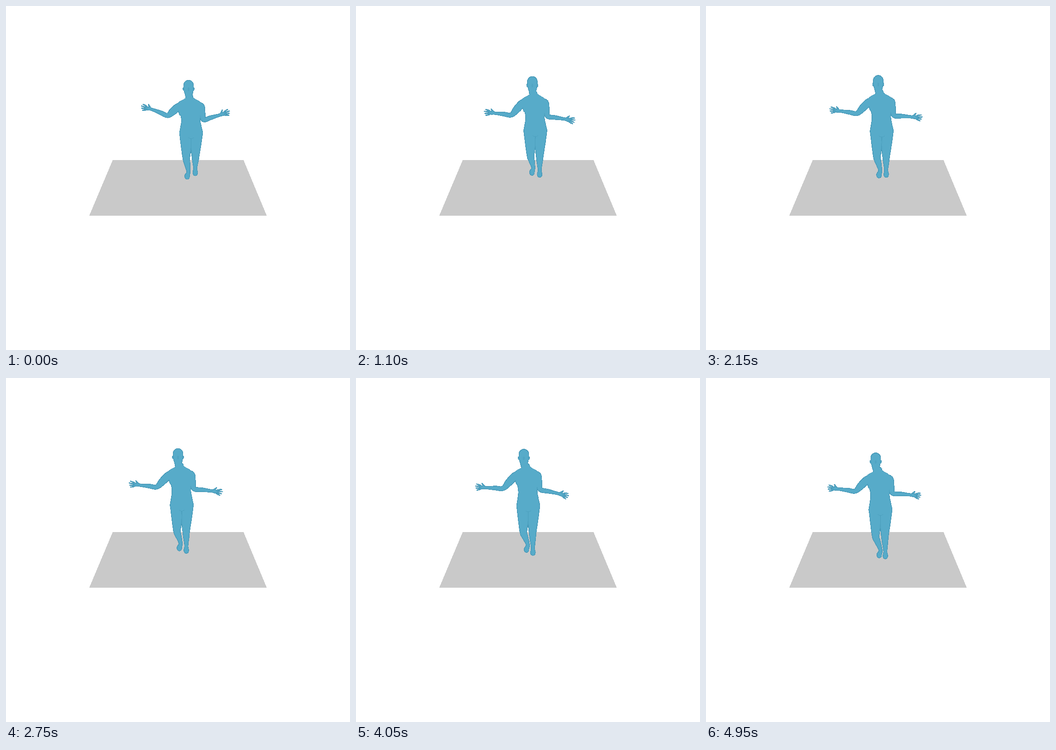
These frames come from a looping animation (748 by 748 pixels, 5000 ms). An HTML page:

```html
<!DOCTYPE html>
<html lang="en">
<head>
<meta charset="utf-8">
<title>Walking figure</title>
<style>
  html, body { margin: 0; width: 100%; height: 100%; overflow: hidden; background: #fff; }
  svg { display: block; width: 100vw; height: 100vh; }
</style>
</head>
<body>
<svg viewBox="0 0 748 748" shape-rendering="crispEdges">
  <path d="M232 335H516.500L567 456H181Z" fill="#c9c9c9"/>
  <g id="body">
    <path fill="#4595b4"/>
    <path fill="#4ea2c1"/>
    <path fill="#57abc9"/>
  </g>
  <ellipse id="nose" rx="2" ry="4" fill="#4b9ebd" opacity=".5"/>
  <path id="crease" fill="none" stroke="#4a9ebd" opacity=".7"/>
</svg>
<script>
const LOOP = 5000, STEP = 50;

// Key poses: top of the head, height of the hands, lead of the right foot
const keys = {
  time: [0, 650, 1600, 2750, 3450, 4050, 4950],
  x:    [397, 391, 375, 374, 369, 365, 369],
  y:    [161, 158, 151.5, 153, 153.5, 154.5, 162.5],
  hand: [5, 25, 17, 21, 25, 25, 20],
  lead: [-8, 16, -3, 5, 5.5, 6.5, 2]
};

const mix = (a, b, u) => a + (b - a) * u;
const between = (a, b, u, r) => [mix(a[0], b[0], u), mix(a[1], b[1], u), r];
const cubic = (a, b, c, d, u) =>
  b + u * (c - a + u * (2 * a - 5 * b + 4 * c - d + u * (3 * (b - c) + d - a))) / 2;

// Smooth round-ended tube through nodes of [x, y, radius]
function tube(nodes, inset) {
  const pts = [], last = nodes.length - 1, n = 6;
  for (let i = 0; i < last; i++) {
    const a = nodes[Math.max(0, i - 1)], b = nodes[i];
    const c = nodes[i + 1], d = nodes[Math.min(last, i + 2)];
    for (let k = 0; k < n; k++) pts.push([0, 1, 2].map(j => cubic(a[j], b[j], c[j], d[j], k / n)));
  }
  pts.push(nodes[last]);
  const size = p => Math.max(.3, p[2] - inset);
  const left = [], right = [];
  pts.forEach((point, i) => {
    const p = pts[Math.max(0, i - 1)], q = pts[Math.min(pts.length - 1, i + 1)];
    const dx = q[0] - p[0], dy = q[1] - p[1], k = size(point) / (Math.hypot(dx, dy) || 1);
    const [x, y] = point;
    left.push((x + dy * k).toFixed(2) + " " + (y - dx * k).toFixed(2));
    right.unshift((x - dy * k).toFixed(2) + " " + (y + dx * k).toFixed(2));
  });
  const cap = (p, to) => `A${size(p)} ${size(p)} 0 0 1 ${to}`;
  return "M" + left.join("L") + cap(nodes[last], right[0]) + "L" + right.join("L") +
    cap(nodes[0], left[0]) + "Z";
}

function poseAt(t) {
  const { time } = keys;
  let i = 0;
  while (i < time.length - 2 && t >= time[i + 1]) i++;
  const span = time[i + 1] - time[i], u = (t - time[i]) / span;
  const at = name => mix(keys[name][i], keys[name][i + 1], u);

  // The figure bobs in whole steps between poses and grows as it comes nearer
  const wave = Math.sin(2 * Math.PI * u * Math.round(span / 480));
  const near = t / LOOP, grow = Math.min(1, near * 1.8), scale = .94 + .06 * grow;
  const head = [at("x"), at("y") + 6 * wave];
  const lean = 5.5 + 5 * near, lead = at("lead") / 2 + 4 * wave, hand = at("hand");
  const hip = [head[0] + lean, head[1] + 118 + 9 * grow];
  const chest = [head[0] + lean * .8, head[1] + 59];
  const from = (base, dx, dy) => [base[0] + dx, base[1] + dy];
  const knee = 51 + 4 * near, ankle = 77 + 9 * near;
  return {
    head, hip, chest,
    elbowL: from(chest, -53 * scale, 16 + .42 * hand),
    wristL: from(chest, -89 * scale, hand),
    elbowR: from(chest, 28.5, 29 * scale),
    wristR: from(chest, 66 * scale, hand + 12.5),
    kneeL: from(hip, -10.5, knee - lead / 4),
    ankleL: from(hip, 6 * near - 6, ankle - lead),
    kneeR: from(hip, 9.5, knee + lead / 4),
    ankleR: from(hip, 9 + 1.5 * near, ankle + lead)
  };
}

function arm(shoulder, elbow, wrist, side) {
  const rise = wrist[1] - elbow[1];
  const dir = Math.atan2(side < 0 ? .35 * rise - 1.3 : .8 * rise, 24);
  const point = (len, turn, r) =>
    [wrist[0] + side * len * Math.cos(dir + turn), wrist[1] + len * Math.sin(dir + turn), r];
  const parts = [[
    [shoulder[0] - side * 7, shoulder[1] + 1, 10],
    [...shoulder, 8.8],
    between(shoulder, elbow, .5, side < 0 ? 8.4 : 7),
    [...elbow, 5.6],
    between(elbow, wrist, .45, 5),
    [...wrist, 3.5],
    point(8, 0, 4.4)
  ]];
  for (let i = 0; i < 4; i++) {
    const turn = .2 * i - .28;
    parts.push([point(8, 0, 2), point(15, turn, 1.7), point(24 - 1.5 * Math.abs(i - 1), turn, 1.2)]);
  }
  parts.push([point(3, 0, 2.6), point(9, -.6, 2), point(13, -.7, 1.3)]);
  return parts;
}

function leg(hip, knee, ankle, side) {
  const start = [hip[0] + side * 12.8, hip[1] - 2, 12.8];
  const thigh = between(start, knee, .5, 11.8);
  thigh[0] -= side;
  const toe = side < 0 ? -2.5 : 0;
  return [
    start, thigh,
    [...knee, 8.2],
    between(knee, ankle, .36, 7),
    [...ankle, 4.4],
    [ankle[0] + toe, ankle[1] + 9, 5.8],
    [ankle[0] + toe, ankle[1] + 12, 5.6]
  ];
}

function figure(p) {
  const [hx, top] = p.head, [cx, cy] = p.chest, [px, py] = p.hip;
  const spine = (u, r) => between(p.chest, p.hip, u, r);
  const ear = side => [[hx + side * 11.2, top + 18, 1.8], [hx + side * 10.8, top + 22, 1.6]];
  return [
    [[hx, top + 11, 11.3], [hx, top + 19, 11.2], [hx + .3, top + 27, 9.7],
      [hx + .7, top + 33, 8.3], [mix(hx, cx, .5), top + 44, 8.5]],
    ear(-1), ear(1),
    [[cx - 2, cy - 21, 8], [cx - 2, cy - 18, 12], [cx - 2, cy - 13, 21], [cx - 2, cy - 7, 27],
      [cx - 1.5, cy, 28], [cx - 1, cy + 9, 25.5], spine(.26, 23), spine(.5, 21),
      spine(.75, 23.5), [px, py, 25.5], [px, py + 5, 14], [px, py + 8, 3]],
    ...arm([cx - 27, cy], p.elbowL, p.wristL, -1),
    ...arm([cx + 22, cy - 1], p.elbowR, p.wristR, 1),
    leg(p.hip, p.kneeL, p.ankleL, -1),
    leg(p.hip, p.kneeR, p.ankleR, 1)
  ];
}

const layers = document.querySelectorAll("#body path");
const nose = document.getElementById("nose");
const crease = document.getElementById("crease");

function draw(t) {
  const p = poseAt(t), parts = figure(p);
  layers.forEach((layer, i) =>
    layer.setAttribute("d", parts.map(nodes => tube(nodes, i * .9)).join("")));
  nose.setAttribute("cx", p.head[0]);
  nose.setAttribute("cy", p.head[1] + 20);
  const [x, y] = p.hip, kx = (p.kneeL[0] + p.kneeR[0]) / 2;
  crease.setAttribute("d", `M${x - 6} ${y + 7}Q${x} ${y + 12} ${x + 6} ${y + 7}` +
    `M${x} ${y + 10}L${mix(x, kx, .7)} ${mix(y + 10, p.kneeL[1], .7)}`);
}

const begin = performance.now();
function tick() {
  const t = (performance.now() - begin) % LOOP;
  draw(Math.floor(t / STEP) * STEP);
  requestAnimationFrame(tick);
}
draw(0);
requestAnimationFrame(tick);
</script>
</body>
</html>
```
